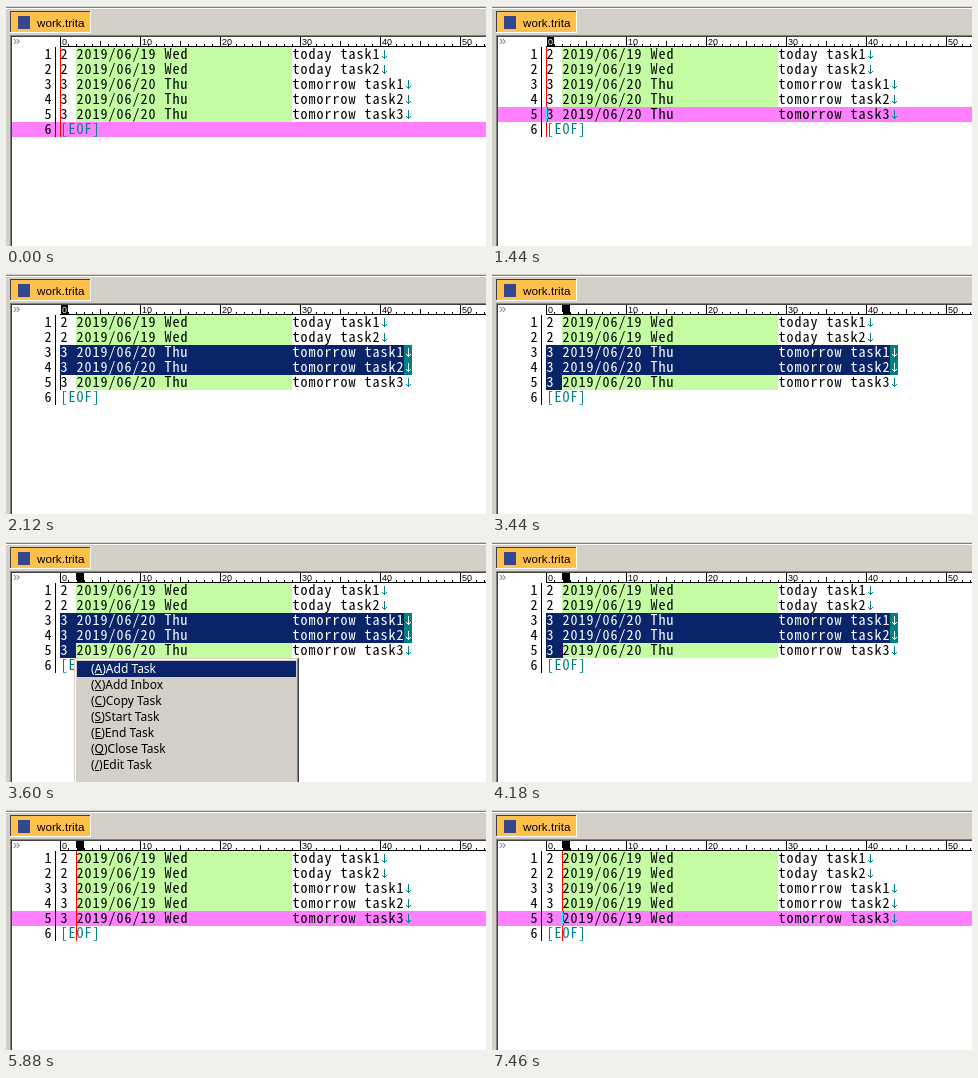
Animation of 480x240 px, one loop 7.62 s. Source, as an HTML page with a canvas:

```html
<!DOCTYPE html>
<html lang="en">
<head>
<meta charset="utf-8">
<title>Task list editor</title>
<style>
html, body { margin: 0; width: 100%; height: 100%; overflow: hidden; background: #fff; }
canvas { display: block; }
</style>
</head>
<body>
<canvas id="stage" width="480" height="240"></canvas>
<script>
const ctx = document.getElementById('stage').getContext('2d');
const LOOP = 7620, LEFT = 54, TOP = 41, CELL = 8, ROW = 15;
const NAVY = '#0a246a', TEAL = '#008080', FACE = '#d4d0c8', PINK = '#ff80ff', GREEN = '#c4fca4';
const MONO = '300 14px "Noto Sans Mono CJK JP", "Noto Sans CJK JP", "Noto Sans Mono", monospace';
const UI = '12px "Noto Sans", sans-serif';
const TASKS = ['today task1', 'today task2', 'tomorrow task1', 'tomorrow task2', 'tomorrow task3'];
const MENU = ['AAdd Task', 'XAdd Inbox', 'CCopy Task', 'SStart Task', 'EEnd Task', 'QClose Task', '/Edit Task'];

// time, caret row, caret column, caret shown, selecting
const STEPS = [
  [0, 5, 0, 0, 0], [430, 5, 0, 1, 0], [1010, 5, 0, 0, 0],
  [1440, 4, 0, 1, 0], [1570, 3, 0, 1, 0], [1720, 2, 0, 1, 0],
  [2000, 3, 0, 1, 1], [2120, 4, 0, 1, 1], [2550, 4, 1, 1, 1],
  [2860, 4, 2, 1, 1], [3440, 4, 2, 0, 1], [4180, 4, 2, 1, 1],
  [4330, 4, 2, 1, 0], [4890, 4, 2, 0, 0], [5320, 4, 2, 1, 0],
  [5880, 4, 2, 0, 0], [6450, 4, 2, 1, 0], [7030, 4, 2, 0, 0], [7460, 4, 2, 1, 0]
];

const colX = c => LEFT + c * CELL;
const rowY = r => TOP + r * ROW;

function box(x, y, w, h, color) {
  ctx.fillStyle = color;
  ctx.fillRect(x, y, w, h);
}

function text(s, x, y, color, font) {
  ctx.font = font;
  ctx.fillStyle = color;
  ctx.fillText(s, x, y);
}

function cells(s, col, row, color) {
  [...s].forEach((ch, i) => text(ch, colX(col + i) + 0.5, rowY(row) + 12, color, MONO));
}

function invert(x, y, w, h) {
  ctx.globalCompositeOperation = 'difference';
  box(x, y, w, h, '#fff');
  ctx.globalCompositeOperation = 'source-over';
}

function drawFrame() {
  box(0, 0, 480, 240, FACE);
  box(0, 1, 480, 1, '#808080');
  box(0, 2, 480, 1, '#fff');
  box(4, 29, 476, 211, '#808080');
  box(5, 30, 475, 210, '#404040');
  box(6, 31, 474, 209, '#fff');
  box(4, 5, 81, 22, '#fff');
  box(4, 5, 80, 21, '#404040');
  box(5, 6, 79, 20, '#ffc04c');
  box(12, 10, 12, 13, '#34468c');
  text('work.trita', 31, 21, '#000', '11.7px "Liberation Sans", sans-serif');
  text('»', 7, 39, '#808080', '13px "Liberation Sans", sans-serif');
}

function drawRuler(col, marked) {
  for (let c = 0; colX(c) < 480; c++) {
    const h = c % 10 === 0 ? 9 : c % 5 === 0 ? 5 : 2;
    box(colX(c), 40 - h, 1, h, '#000');
    if (c % 10 === 0) text(c, colX(c) + 2, 39, '#000', '9px "Liberation Sans", sans-serif');
  }
  box(LEFT, 40, 426, 1, '#000');
  if (marked) invert(colX(col), 31, CELL, 9);
}

function drawArrow(col, row, color) {
  const x = colX(col) + 4, y = rowY(row);
  box(x, y + 3, 1, 9, color);
  for (let i = 1; i < 3; i++) {
    box(x - i, y + 11 - i, 1, 1, color);
    box(x + i, y + 11 - i, 1, 1, color);
  }
}

function drawRow(r, current, selected, moved) {
  const y = rowY(r);
  if (current) box(6, y, 474, ROW, PINK);
  cells(String(r + 1), -2, r, '#000');
  box(49, y, 1, ROW, '#000');
  if (r === 5) return cells('[EOF]', 0, r, TEAL);

  const task = TASKS[r], end = 29 + task.length;
  const day = r < 2 || moved ? '19 Wed' : '20 Thu';
  if (!current) box(colX(2), y, 27 * CELL, ROW, GREEN);
  box(LEFT, y, Math.min(selected, end) * CELL, ROW, NAVY);
  if (selected > end) box(colX(end), y, CELL, ROW, TEAL);

  const line = ((r < 2 ? '2' : '3') + ' 2019/06/' + day).padEnd(29) + task;
  [...line].forEach((ch, c) => cells(ch, c, r, c < selected ? '#fff' : '#000'));
  drawArrow(end, r, selected > end ? '#fff' : TEAL);
}

function drawMenu() {
  box(68, 116, 225, 130, '#404040');
  box(68, 116, 224, 130, FACE);
  box(69, 117, 222, 130, '#fff');
  box(70, 118, 221, 130, FACE);
  box(291, 117, 1, 130, '#808080');
  box(71, 119, 219, 16, NAVY);
  MENU.forEach((item, i) => {
    const y = 131 + i * 16, color = i ? '#000' : '#fff';
    text('(' + item[0] + ')' + item.slice(1), 85, y, color, UI);
    const x = 85 + ctx.measureText('(').width;
    box(Math.round(x), y + 1, Math.round(ctx.measureText(item[0]).width), 1, color);
  });
}

function draw(t) {
  const [, row, col, shown, selecting] = STEPS.findLast(s => s[0] <= t);
  drawFrame();
  drawRuler(col, t >= 430);
  for (let r = 0; r < 6; r++) {
    const selected = !selecting || r < 2 || r > row ? 0 : r < row ? 99 : col;
    drawRow(r, !selecting && r === row, selected, t >= 4330);
  }
  if (!selecting) box(colX(col), TOP, 1, 6 * ROW, '#f00');
  if (shown) invert(colX(col), rowY(row), selecting ? 1 : 2, ROW);
  if (t >= 3600 && t < 4180) drawMenu();
}

const start = performance.now();
function tick() {
  draw((performance.now() - start) % LOOP);
  requestAnimationFrame(tick);
}
tick();
</script>
</body>
</html>
```
